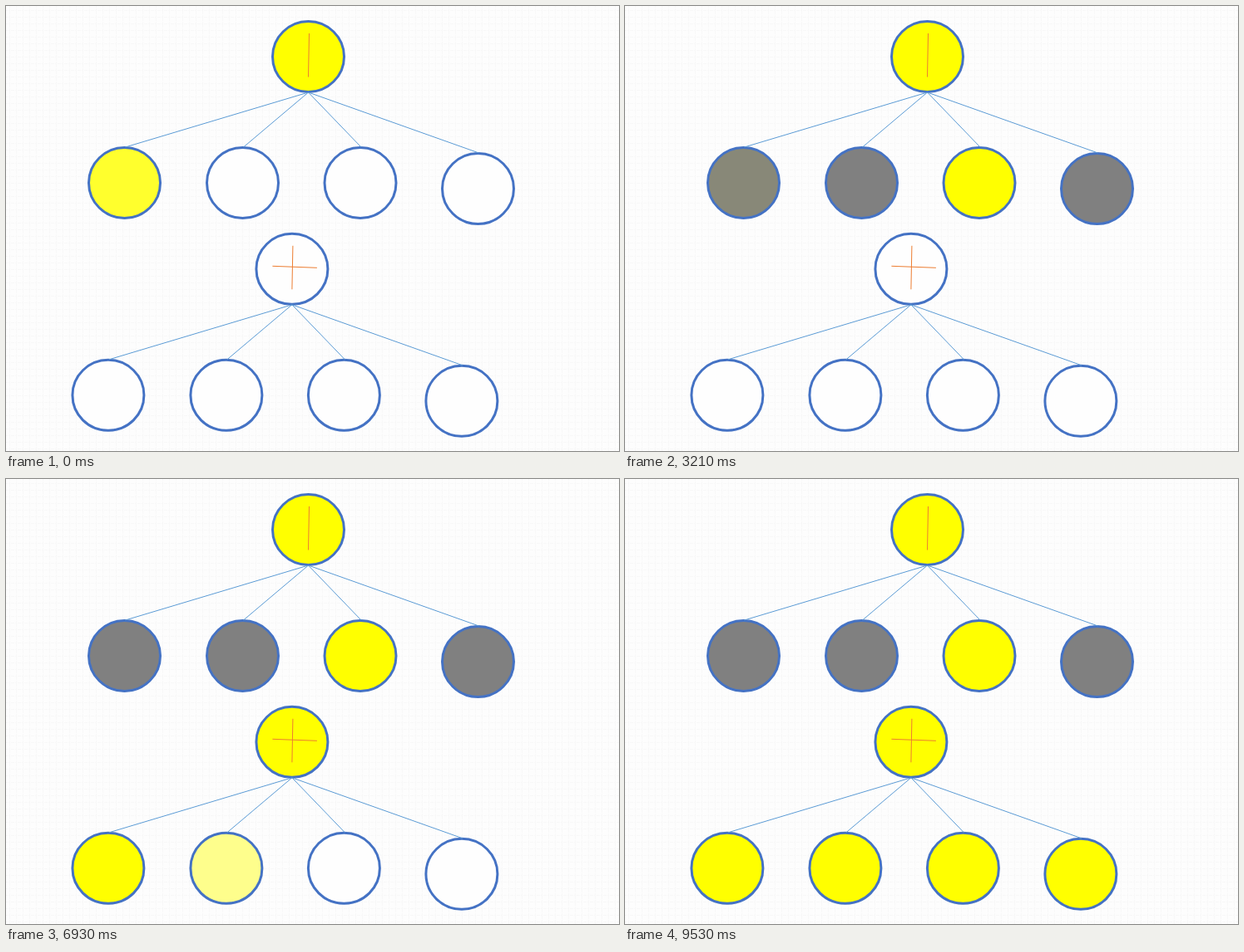
An HTML page that plays this animation: 737x536 px, repeating every 10 s.

```html
<!DOCTYPE html>
<html lang="en">
<head>
<meta charset="utf-8">
<title>Two trees</title>
<style>
  html, body { margin: 0; width: 100%; height: 100%; overflow: hidden; background: #fdfdfd; }
  svg { display: block; }
  ellipse { stroke: #4472c4; stroke-width: 3; }
  .edge { stroke: #5b9bd5; }
  .mark { stroke: #ed7d31; }
</style>
</head>
<body>
<svg id="stage" width="737" height="536" viewBox="0 0 737 536">
  <defs>
    <pattern id="grid" width="8" height="8" patternUnits="userSpaceOnUse">
      <path d="M0 5.5H8M4.5 0V8" stroke="#f8f8f8" stroke-dasharray="2 1"/>
    </pattern>
  </defs>
  <rect width="737" height="536" fill="#fdfdfd"/>
  <rect width="737" height="536" fill="url(#grid)"/>
</svg>
<script>
const LOOP = 10000;
const WHITE = [254, 254, 254], YELLOW = [255, 255, 0], GRAY = [128, 128, 128];
const mix = (a, b, k) => a.map((v, i) => v + (b[i] - v) * k);
const fade = (start, end, from, to) => [[start, from], [end, to]];

// Some fades stop short and are completed by a later jump.
const almostYellow = mix(WHITE, YELLOW, 0.82);
const lightGray = mix(WHITE, GRAY, 0.71);
const oliveGray = mix(YELLOW, GRAY, 0.94);

// Colour keyframes [time, colour]: the root first, then its children.
const topTracks = [
  [[0, YELLOW]],
  [...fade(0, 70, almostYellow, YELLOW), ...fade(2320, 2780, YELLOW, oliveGray),
    ...fade(5800, 5800, oliveGray, GRAY)],
  [...fade(80, 420, WHITE, lightGray), ...fade(2360, 2360, lightGray, GRAY)],
  [...fade(560, 1030, WHITE, GRAY), ...fade(2780, 3210, GRAY, YELLOW)],
  fade(1030, 1460, WHITE, GRAY)
];
const bottomTracks = [
  [5750, 6240], [6250, 6720], [6735, 7170], [7190, 7630], [7650, 8110]
].map(([start, end]) => fade(start, end, WHITE, YELLOW));

const nodes = [[363.5, 61], [142.5, 213], [284.5, 213], [426, 213], [567.5, 220]];
const stage = document.getElementById("stage");
const animated = [];

function add(parent, tag, attributes) {
  const element = document.createElementNS("http://www.w3.org/2000/svg", tag);
  for (const name in attributes) element.setAttribute(name, attributes[name]);
  return parent.appendChild(element);
}

function line(parent, kind, x1, y1, x2, y2) {
  add(parent, "line", { class: kind, x1, y1, x2, y2 });
}

function addTree(dx, dy, tracks, crossed) {
  const tree = add(stage, "g", { transform: `translate(${dx} ${dy})` });
  nodes.forEach(([cx, cy], i) => {
    const shape = add(tree, "ellipse", { cx, cy, rx: 43, ry: 42.5 });
    animated.push({ shape, track: tracks[i] });
  });
  for (const [x, y] of nodes.slice(1)) line(tree, "edge", 363.5, 104, x + 1, y - 43);
  line(tree, "mark", 364.5, 33, 363.5, 85.5);
  if (crossed) line(tree, "mark", 340, 57.5, 393.5, 59.5);
}

function colorAt(track, time) {
  const next = track.findIndex(([at]) => at > time);
  if (next < 0) return track[track.length - 1][1];
  if (next === 0) return track[0][1];
  const [t0, from] = track[next - 1], [t1, to] = track[next];
  return mix(from, to, (time - t0) / (t1 - t0));
}

function draw(now) {
  const time = now % LOOP;
  for (const { shape, track } of animated) {
    shape.setAttribute("fill", `rgb(${colorAt(track, time).map(Math.round)})`);
  }
}

addTree(0, 0, topTracks, false);
addTree(-19.6, 255.8, bottomTracks, true);

const start = performance.now();
function tick() {
  draw(performance.now() - start);
  requestAnimationFrame(tick);
}
tick();
</script>
</body>
</html>
```
